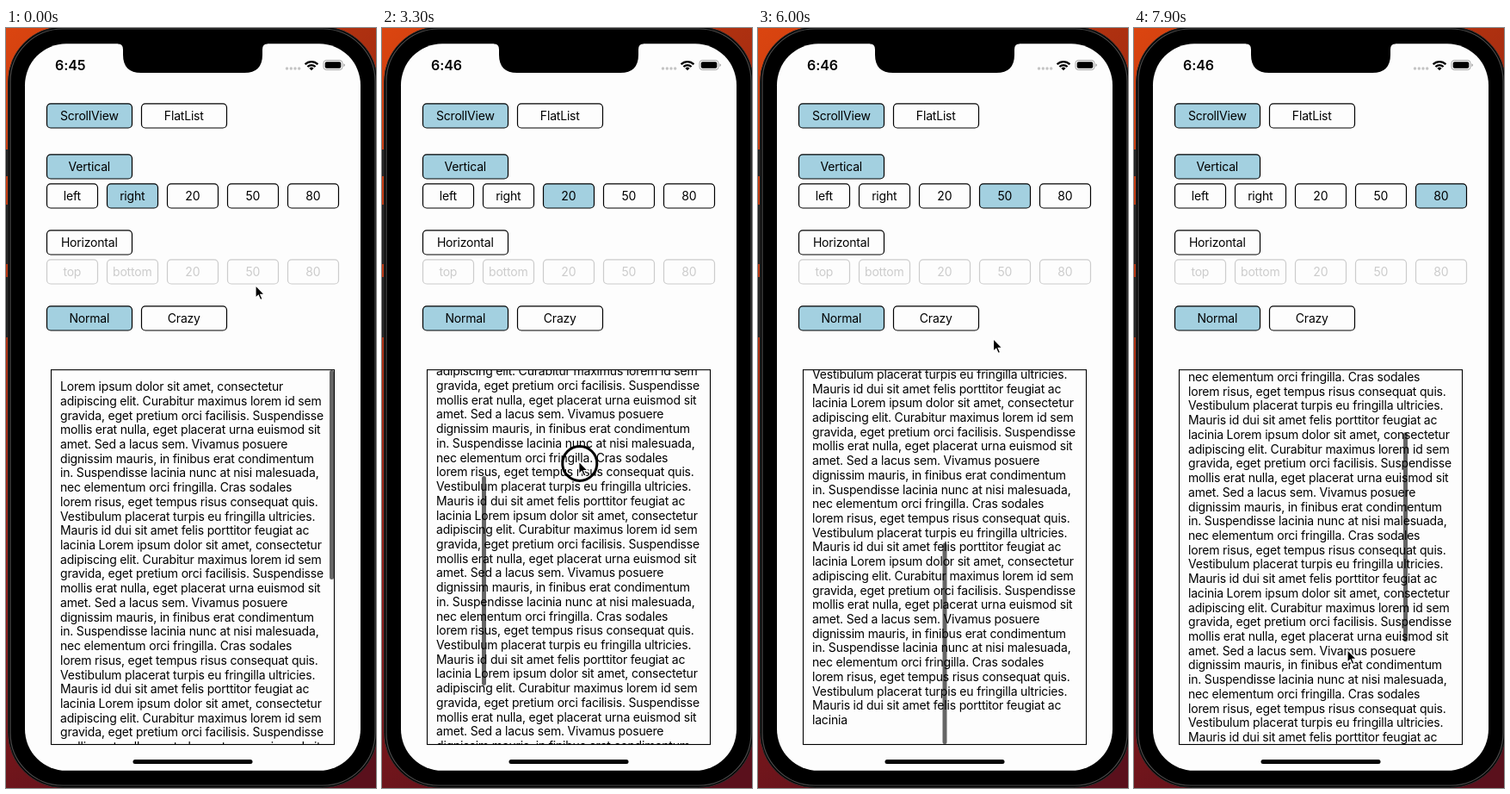
Recreate the animation shown at these times as an HTML page. Size 430 px wide and 882 px high, loop 8 s.

```html
<!DOCTYPE html>
<html lang="en">
<head>
<meta charset="utf-8">
<title>Scroll indicator demo</title>
<style>
  html, body { margin: 0; width: 100%; height: 100%; overflow: hidden; background: #000; }
  svg { display: block; width: 430px; height: 882px; }
  text { font: 14px Inter, Roboto, sans-serif; letter-spacing: -0.19px; white-space: pre; }
  .label { text-anchor: middle; }
  .clock { font-size: 16px; font-weight: 600; letter-spacing: -0.1px; }
  .button rect { fill: #fdfdfd; stroke: #000; stroke-width: 1.2; }
  .button.on rect { fill: #a3d0e0; }
  .button.off rect { stroke: #ccc; }
  .button.off text { fill: #ccc; }
</style>
</head>
<body>
<svg viewBox="0 0 430 882">
  <defs>
    <linearGradient id="wall" x1="0" y1="0" x2=".4" y2="1">
      <stop offset="0" stop-color="#db4510"/>
      <stop offset=".34" stop-color="#ad3010"/>
      <stop offset=".65" stop-color="#8c1c1a"/>
      <stop offset="1" stop-color="#5a101c"/>
    </linearGradient>
    <clipPath id="view"><rect x="53" y="397" width="328" height="434"/></clipPath>
  </defs>

  <rect width="430" height="882" fill="url(#wall)"/>
  <g fill="#222">
    <rect x="-2" y="141" width="6" height="31" rx="1"/>
    <rect x="-2" y="205" width="6" height="69" rx="1"/>
    <rect x="-2" y="289" width="6" height="70" rx="1"/>
  </g>
  <rect x="2.5" y="-1.5" width="429" height="883" rx="64" fill="#000" stroke="#2b2b2b"/>
  <rect x="5" y="1" width="424" height="878" rx="61" fill="none" stroke="#4a4a4a" stroke-width="1.2"/>
  <rect x="22" y="18.3" width="390" height="843.5" rx="48" fill="#fdfdfd"/>
  <path d="M130 17.5H304V18.3Q298 18.3 298 25V31Q298 52 277 52H157Q136 52 136 31V25Q136 18.3 130 18.3Z"/>

  <text id="clock" class="clock" x="57" y="48.7">6:45</text>
  <g fill="#c4c4c4">
    <circle cx="326.5" cy="47" r="1.7"/><circle cx="331.3" cy="47" r="1.7"/>
    <circle cx="336" cy="47" r="1.7"/><circle cx="340.7" cy="47" r="1.7"/>
  </g>
  <g fill="none" stroke="#000" stroke-width="2.3">
    <path d="M347.6 42.1A10.6 10.6 0 0 1 362.4 42.1"/>
    <path d="M350.4 45A6.6 6.6 0 0 1 359.6 45"/>
  </g>
  <path d="M355 49.3L352.4 46.7A3.7 3.7 0 0 1 357.6 46.7Z"/>
  <rect x="369" y="37.5" width="22" height="11" rx="3.2" fill="none" stroke="#a5a5a5"/>
  <rect x="370.7" y="39.2" width="18.6" height="7.6" rx="1.8"/>
  <path d="M392.4 41.2Q394 42 394 43T392.4 44.9Z" fill="#a5a5a5"/>

  <g id="buttons"></g>

  <g clip-path="url(#view)">
    <g id="content"></g>
    <rect id="thumb" width="5" rx="2.5" fill="#000" fill-opacity=".6"/>
  </g>
  <rect x="52.5" y="396.7" width="329" height="434.8" fill="none" stroke="#000" stroke-width="1.1"/>
  <rect x="147.5" y="849" width="139" height="5" rx="2.5"/>

  <g id="pointer">
    <circle id="ring" cx="1" cy="2" r="20" fill="none" stroke="#000" stroke-width="3"/>
    <path d="M0 -.5V14.2L3.3 11.2L5.6 16.6L8.1 15.5L5.8 10.3H10.4Z" stroke="#fff" stroke-width="1.2"/>
  </g>
</svg>

<script>
const $ = id => document.getElementById(id);

function add(parent, tag, attrs, text = "") {
  const el = document.createElementNS("http://www.w3.org/2000/svg", tag);
  for (const key in attrs) el.setAttribute(key, attrs[key]);
  el.textContent = text;
  parent.append(el);
  return el;
}

// Buttons
function addRow(y, width, labels, state = "") {
  return labels.map((label, i) => {
    const x = 47 + i * (width + 10);
    const g = add($("buttons"), "g", { class: "button " + state });
    add(g, "rect", { x: x + .5, y: y + .8, width: width - 1, height: 28.2, rx: 4.5 });
    add(g, "text", { class: "label", x: x + width / 2 - .2, y: y + 19.9 }, label);
    return g;
  });
}
const modes = addRow(87, 100, ["ScrollView", "FlatList"]);
const vertical = addRow(146, 100, ["Vertical"]);
const places = addRow(180, 60, ["left", "right", "20", "50", "80"]);
addRow(234, 100, ["Horizontal"]);
addRow(268, 60, ["top", "bottom", "20", "50", "80"], "off");
const styles = addRow(322, 100, ["Normal", "Crazy"]);
for (const g of [modes[0], vertical[0], styles[0]]) g.classList.add("on");

// Scrolling text
const paragraph = [
  "Lorem ipsum dolor sit amet, consectetur",
  "adipiscing elit. Curabitur maximus lorem id sem",
  "gravida, eget pretium orci facilisis. Suspendisse",
  "mollis erat nulla, eget placerat urna euismod sit",
  "amet. Sed a lacus sem. Vivamus posuere",
  "dignissim mauris, in finibus erat condimentum",
  "in. Suspendisse lacinia nunc at nisi malesuada,",
  "nec elementum orci fringilla. Cras sodales",
  "lorem risus, eget tempus risus consequat quis.",
  "Vestibulum placerat turpis eu fringilla ultricies.",
  "Mauris id dui sit amet felis porttitor feugiat ac"
];
const LINES = 45, PITCH = 16.72;
for (let i = 0; i < LINES; i++) {
  let line = paragraph[i % 11];
  if (i && i % 11 === 0) line = i === LINES - 1 ? "lacinia" : "lacinia " + line;
  add($("content"), "text", { x: 63, y: 421.1 + i * PITCH }, line);
}

// Motion
const LOOP = 8000, STEP = 100;
const VIEW_TOP = 397, THUMB = 243, TRAVEL = 191, MAX_SCROLL = 339;
const linear = p => p;
const smooth = p => p * p * (3 - 2 * p);
const easeOut = p => 1 - (1 - p) ** 2;

// Each step: time, values, easing into it
const pointerPath = [
  [0, [290, 299]],
  [600, [236, 640]],
  [700, [236, 640]],
  [1200, [234, 520], linear],
  [1500, [234, 505], easeOut],
  [2400, [219.5, 177.5]],
  [2600, [217, 196], easeOut],
  [2700, [217, 196]],
  [3000, [230, 571]],
  [3100, [230, 571]],
  [3800, [227.5, 433], easeOut],
  [4500, [287, 196]],
  [4700, [287, 196]],
  [5000, [285.5, 295], linear],
  [5300, [279, 470], easeOut],
  [5800, [274, 400], linear],
  [6000, [273.5, 361], easeOut],
  [6500, [357, 196]],
  [6700, [357, 196]],
  [7000, [327, 346.5], linear],
  [7300, [260, 550], easeOut],
  [7700, [249, 710], linear],
  [7900, [248, 722], easeOut]
];
const scrollPath = [
  [700, [0]],
  [1200, [120], linear],
  [1800, [150.5], easeOut],
  [3100, [150.5]],
  [3800, [289.2], easeOut],
  [4000, [289.8], easeOut],
  [5300, [289.8]],
  [5800, [355], linear],
  [6000, [348.7], easeOut],
  [6300, [MAX_SCROLL], easeOut],
  [7300, [MAX_SCROLL]],
  [7700, [179], linear],
  [7900, [128.1], easeOut]
];
const presses = [[700, 1200], [2600, 2600], [3100, 3800], [4600, 4600], [5300, 5800], [6600, 6600], [7300, 7700]];
// Time, button index, indicator's left edge
const choices = [[0, 1, 376], [2700, 2, 116], [4700, 3, 214.5], [6700, 4, 313]];

function sample(path, t) {
  const i = path.findIndex(step => step[0] > t);
  if (i === 0) return path[0][1];
  if (i < 0) return path.at(-1)[1];
  const [t0, from] = path[i - 1];
  const [t1, to, ease = smooth] = path[i];
  const p = ease((t - t0) / (t1 - t0));
  return from.map((v, k) => v + (to[k] - v) * p);
}

function draw(t) {
  const [x, y] = sample(pointerPath, t);
  $("pointer").setAttribute("transform", `translate(${x} ${y})`);
  const pressed = presses.some(([start, end]) => t >= start && t <= end);
  $("ring").setAttribute("visibility", pressed ? "visible" : "hidden");

  const [scroll] = sample(scrollPath, t);
  $("content").setAttribute("transform", `translate(0 ${-scroll})`);

  const [, active, left] = choices.findLast(choice => choice[0] <= t);
  places.forEach((g, i) => g.classList.toggle("on", i === active));
  const over = Math.max(0, scroll - MAX_SCROLL);
  const thumb = $("thumb");
  thumb.setAttribute("x", left);
  thumb.setAttribute("y", VIEW_TOP + Math.min(scroll / MAX_SCROLL, 1) * TRAVEL + over);
  thumb.setAttribute("height", THUMB - over);

  $("clock").textContent = t < 1200 ? "6:45" : "6:46";
}

const start = performance.now();
function tick() {
  const t = (performance.now() - start) % LOOP;
  draw(Math.floor(t / STEP) * STEP);
  requestAnimationFrame(tick);
}
tick();
</script>
</body>
</html>
```
